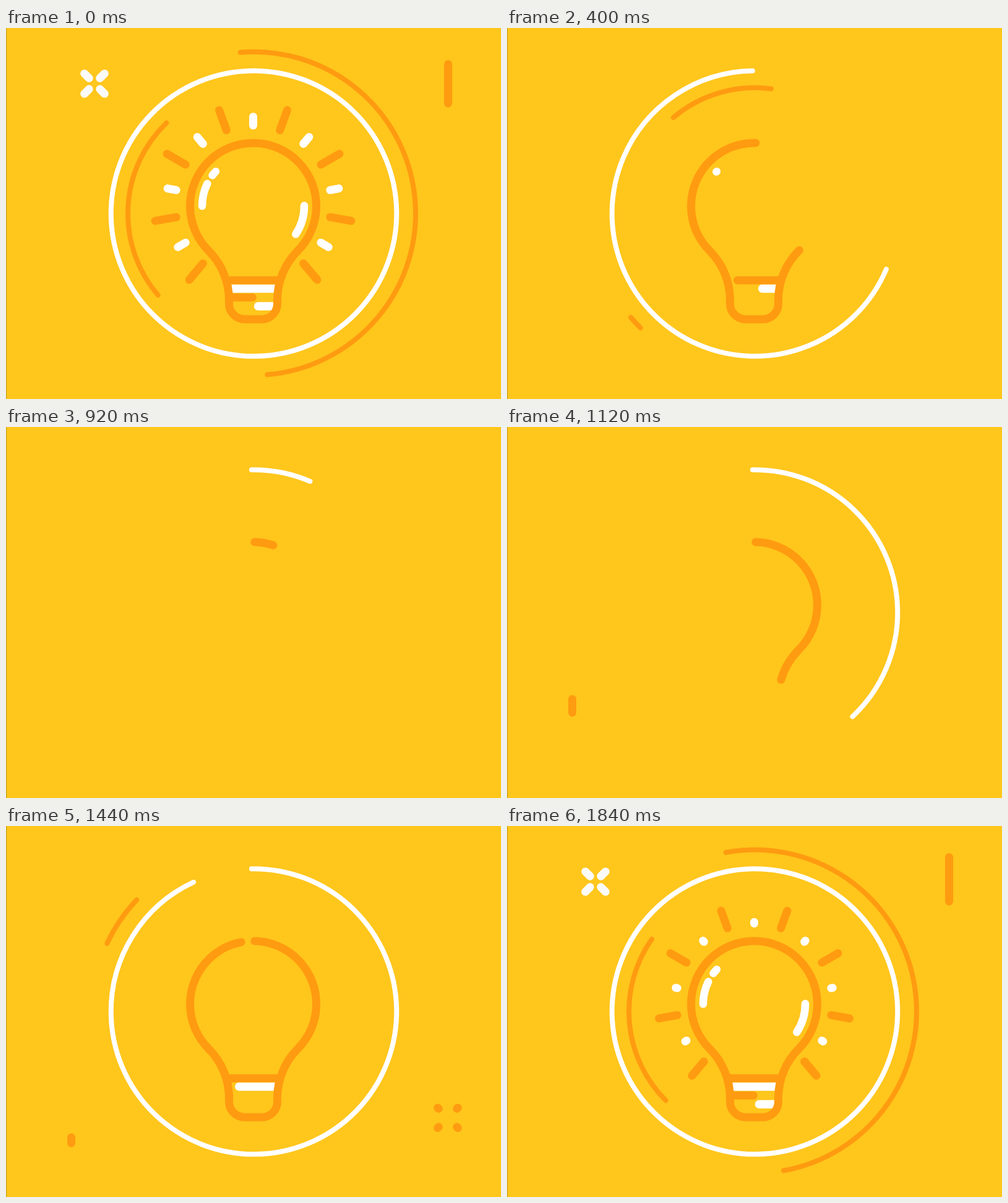
Recreate the animation shown at these times as an HTML page with a canvas. Size 800 px wide and 600 px high, loop 1880 ms.

```html
<!DOCTYPE html>
<html lang="en">
<head>
<meta charset="utf-8">
<title>Light bulb</title>
<style>
  html, body { margin: 0; width: 100%; height: 100%; overflow: hidden; background: #ffc61c; }
  canvas { display: block; }
</style>
</head>
<body>
<canvas id="stage" width="800" height="600"></canvas>
<script>
const ctx = document.getElementById('stage').getContext('2d');
const LOOP = 1880, STEP = 40;
const YELLOW = '#ffc61c', ORANGE = '#ff9b10', WHITE = '#ffffff';
const RAD = Math.PI / 180;
const RING = { x: 400.5, y: 300 };
const BULB = { x: 399.5, y: 288, r: 102 };
const RAYS = { x: 399.5, y: 284, r: 126.3 };
const BULB_LEN = 776;

// The clock runs from one empty stage to the next: 800 to 2680 ms.
let now = 0;

function ease(start, length) {
  const u = Math.min(1, Math.max(0, (now - start) / length));
  return u * u * (3 - 2 * u);
}

// Trimmed part of a stroke: drawn from `a`, wiped from its beginning from `b`.
function span(a, aLen, b, bLen) {
  return [ease(b, bLen), ease(a, aLen)];
}

// Drawn from `a`, then pulled back to its beginning from `b`.
function reach(a, aLen, b, bLen) {
  return [0, ease(a, aLen) * (1 - ease(b, bLen))];
}

function pen(color, width) {
  ctx.strokeStyle = color;
  ctx.lineWidth = width;
}

function line(x1, y1, x2, y2, [from, to]) {
  const dx = x2 - x1, dy = y2 - y1;
  if ((to - from) * Math.hypot(dx, dy) < 0.3) return;
  ctx.beginPath();
  ctx.moveTo(x1 + dx * from, y1 + dy * from);
  ctx.lineTo(x1 + dx * to, y1 + dy * to);
  ctx.stroke();
}

// Angles in degrees, clockwise from the top.
function arc(c, r, start, end) {
  if (end - start < 0.1) return;
  ctx.beginPath();
  ctx.arc(c.x, c.y, r, (start - 90) * RAD, (end - 90) * RAD);
  ctx.stroke();
}

function arcPart(c, r, start, size, [from, to]) {
  arc(c, r, start + size * from, start + size * to);
}

function makeBulb() {
  const p = new Path2D();
  const { x, y, r } = BULB;
  p.arc(x, y, r, -88.7 * RAD, 45 * RAD);
  p.arc(551, 440, 112.5, 225 * RAD, 180 * RAD, true);
  p.arc(413.5, 446, 25, 0, 90 * RAD);
  p.arc(385.5, 446, 25, 90 * RAD, 180 * RAD);
  p.arc(248, 440, 112.5, 0, -45 * RAD, true);
  p.arc(x, y, r, 135 * RAD, 271.3 * RAD);
  return p;
}
const bulb = makeBulb();

function drawRing() {
  const [from, to] = span(800, 760, 2040, 640);
  pen(WHITE, 8);
  arcPart(RING, 230.8, -0.9, 360, [from, to]);
}

function drawOrbits() {
  const t = now - LOOP;
  pen(ORANGE, 8);
  arcPart(RING, 261.5, -4.8 + 0.137 * t, 180, span(1360, 400, 1920, 400));
  const tail = -130.4 + 0.1164 * t + 0.000025 * t * t;
  arcPart(RING, 203.5, tail, 87.3, span(1560, 340, 2130, 320));
}

function drawBase() {
  ctx.save();
  ctx.clip(bulb);
  pen(WHITE, 13.5);
  line(445, 421.5, 353, 421.5, reach(1280, 240, 2160, 200));
  line(445, 450, 407.5, 450, reach(1500, 175, 2040, 160));
  pen(ORANGE, 13);
  line(354, 435.7, 398.3, 435.7, reach(1400, 160, 2100, 160));
  line(443, 408, 353, 408, reach(1200, 200, 2220, 200));
  ctx.restore();
}

function drawBulb() {
  const [from, to] = span(840, 668, 2060, 600);
  if (to - from < 0.001) return;
  pen(ORANGE, 13);
  if (to - from < 1) {
    ctx.setLineDash([(to - from) * BULB_LEN, BULB_LEN * 2]);
    ctx.lineDashOffset = -from * BULB_LEN;
  }
  ctx.stroke(bulb);
  ctx.setLineDash([]);
}

function drawShine() {
  pen(WHITE, 12.5);
  arcPart(BULB, 82.5, 270, 26, span(1520, 165, 2080, 160));
  arcPart(BULB, 82.5, 307, 5.8, span(1660, 100, 2200, 100));
  arcPart(BULB, 82.5, 89.5, 34, span(1520, 175, 2080, 160));
}

function ray(angle, length, part) {
  const s = Math.sin(angle * RAD), c = -Math.cos(angle * RAD);
  const { x, y, r } = RAYS;
  line(x + s * r, y + c * r, x + s * (r + length), y + c * (r + length), part);
}

function drawRays() {
  const long = span(1640, 266, 1940, 160);
  const short = span(1820, 93, 1950, 150);
  for (let a = 0; a <= 140; a += 20) {
    const isLong = a % 40 === 20;
    pen(isLong ? ORANGE : WHITE, 13);
    for (const side of a ? [-1, 1] : [1]) {
      ray(a * side, isLong ? 35.5 : 20, isLong ? long : short);
    }
  }
}

function burst(x, y, color, part) {
  pen(color, 13);
  for (const sx of [-1, 1]) {
    for (const sy of [-1, 1]) {
      line(x + sx * 8.8, y + sy * 8.8, x + sx * 16.3, y + sy * 16.3, part);
    }
  }
}

function drawSparks() {
  burst(143, 90, '#fafafa', span(1700, 120, 1920, 140));
  burst(714, 472, ORANGE, span(1200, 110, 1340, 140));
  pen(ORANGE, 13);
  line(714.5, 48, 714.5, 122, span(1680, 120, 1805, 320));
  line(105.5, 440, 105.5, 513, span(1080, 110, 1192, 320));
}

function draw(t) {
  now = t < 800 ? t + LOOP : t;
  ctx.fillStyle = YELLOW;
  ctx.fillRect(0, 0, 800, 600);
  ctx.lineCap = 'round';
  ctx.lineJoin = 'round';
  drawOrbits();
  drawRing();
  drawBase();
  drawBulb();
  drawShine();
  drawRays();
  drawSparks();
  ctx.fillStyle = '#c0971f';
  ctx.fillRect(0, 0, 1, 600);
}

const begin = performance.now();
function tick() {
  const t = (performance.now() - begin) % LOOP;
  draw(Math.floor(t / STEP) * STEP);
  requestAnimationFrame(tick);
}
draw(0);
requestAnimationFrame(tick);
</script>
</body>
</html>
```
